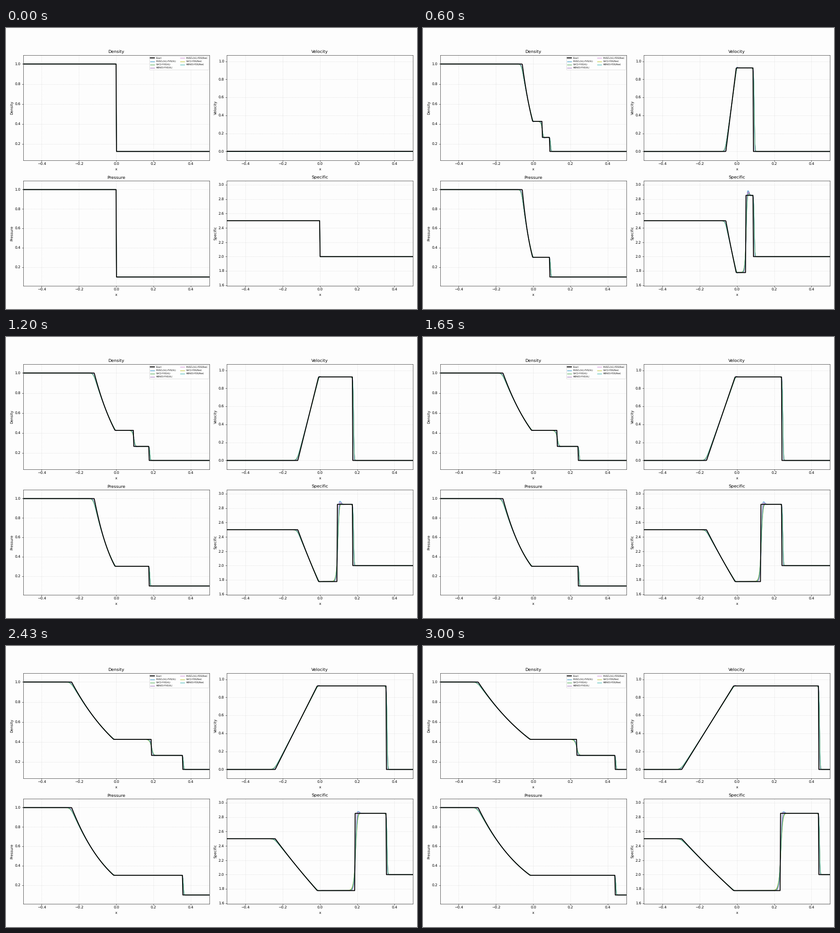
These frames come from a looping animation (903 px wide and 620 px high, 3030 ms). A matplotlib script:

```python
"""Sod shock tube: six finite-difference schemes against the exact solution."""
import numpy as np
import matplotlib.pyplot as plt
from matplotlib.animation import FuncAnimation

plt.rcParams["font.family"] = "DejaVu Sans"
plt.rcParams["text.hinting"] = "none"

G = 1.4
FRAMES, INTERVAL = 101, 30
T_FRAME, SUBSTEPS = 0.0025, 5
W, H, DPI = 903, 620, 56.4375

x = np.linspace(-0.5, 0.5, 400)
dx = x[1] - x[0]


# ---- gas dynamics ----
def primitive(q):
    rho = np.maximum(q[0], 1e-6)
    u = q[1] / rho
    p = np.maximum((G - 1) * (q[2] - 0.5 * rho * u * u), 1e-6)
    return rho, u, p


def flux(q, u, p):
    return np.array([q[1], q[1] * u + p, (q[2] + p) * u])


def van_leer_split(q, s):
    """Forward (s=1) or backward (s=-1) part of the flux."""
    rho, u, p = primitive(q)
    c = np.sqrt(G * p / rho)
    m = u / c
    mass = s * rho * c * (m + s) ** 2 / 4
    w = (G - 1) * u + 2 * s * c
    part = np.array([mass, mass * w / G, mass * w * w / (2 * (G * G - 1))])
    part = np.where(s * m >= 1, flux(q, u, p), part)
    return np.where(s * m <= -1, 0.0, part)


def roe_flux(ql, qr):
    rl, ul, pl = primitive(ql)
    rr, ur, pr = primitive(qr)
    a, b = np.sqrt(rl), np.sqrt(rr)
    hl, hr = (ql[2] + pl) / rl, (qr[2] + pr) / rr
    u = (a * ul + b * ur) / (a + b)
    h = (a * hl + b * hr) / (a + b)
    c2 = np.maximum((G - 1) * (h - 0.5 * u * u), 1e-6)
    c = np.sqrt(c2)
    dp, du = pr - pl, ur - ul
    k = a * b * c * du
    w1 = np.abs(u - c) * (dp - k) / (2 * c2)
    w2 = np.abs(u) * (rr - rl - dp / c2)
    w3 = np.abs(u + c) * (dp + k) / (2 * c2)
    diss = np.array([
        w1 + w2 + w3,
        w1 * (u - c) + w2 * u + w3 * (u + c),
        w1 * (h - u * c) + w2 * 0.5 * u * u + w3 * (h + u * c),
    ])
    return 0.5 * (flux(ql, ul, pl) + flux(qr, ur, pr) - diss)


# ---- reconstruction at the face between b and c, upwind side a ----
def muscl(a, b, c):
    dl, dr = b - a, c - b
    total = dl + dr
    return b + np.maximum(dl * dr, 0) / np.where(total == 0, 1, total)


def gvc2(a, b, c):
    dl, dr = b - a, c - b
    return b + 0.5 * np.where(np.abs(dl) < np.abs(dr), dl, dr)


def weno3(a, b, c):
    w0 = 1 / (1e-6 + (b - a) ** 2) ** 2
    w1 = 2 / (1e-6 + (c - b) ** 2) ** 2
    return (w0 * (1.5 * b - 0.5 * a) + w1 * 0.5 * (b + c)) / (w0 + w1)


def stencil(v):
    return v[:, :-3], v[:, 1:-2], v[:, 2:-1], v[:, 3:]


def fvs(q, rec):
    a, b, c, _ = stencil(van_leer_split(q, 1))
    _, e, f, g = stencil(van_leer_split(q, -1))
    return rec(a, b, c) + rec(g, f, e)


def fds(q, rec):
    a, b, c, d = stencil(q)
    return roe_flux(rec(a, b, c), rec(d, c, b))


def fields(rho, u, p):
    return rho, u, p, p / ((G - 1) * rho)


def solve(method, rec):
    """Initial state, then snapshots running one output step ahead."""
    left = x < 0
    q = np.array([np.where(left, 1, 0.125), 0 * x,
                  np.where(left, 1, 0.1) / (G - 1)])
    dt = T_FRAME / SUBSTEPS

    def euler(q):
        padded = np.concatenate([q[:, :1], q[:, :1], q, q[:, -1:], q[:, -1:]],
                                axis=1)
        f = method(padded, rec)
        return q - dt / dx * (f[:, 1:] - f[:, :-1])

    history = [fields(*primitive(q))]
    for i in range(1, FRAMES):
        for _ in range(SUBSTEPS * (2 if i == 1 else 1)):
            q1 = euler(q)
            q2 = 0.75 * q + 0.25 * euler(q1)
            q = q / 3 + 2 / 3 * euler(q2)
        history.append(fields(*primitive(q)))
    return history


def exact(t):
    ps, us = 0.30313018, 0.92745262
    cl = np.sqrt(G)
    rho_l = ps ** (1 / G)
    ratio, mu = ps / 0.1, (G - 1) / (G + 1)
    rho_r = 0.125 * (ratio + mu) / (1 + mu * ratio)
    shock = us * rho_r / (rho_r - 0.125)
    tail = us - np.sqrt(G * ps / rho_l)

    s = x / max(t, 1e-12)
    fan_u = 2 / (G + 1) * (cl + s)
    fan_c = np.clip(1 - (G - 1) / 2 * fan_u / cl, 0.1, 1)
    zones = [s < -cl, s < tail, s < us, s < shock]
    rho = np.select(zones, [1, fan_c ** (2 / (G - 1)), rho_l, rho_r], 0.125)
    u = np.select(zones, [0, fan_u, us, us], 0)
    p = np.select(zones, [1, fan_c ** (2 * G / (G - 1)), ps, ps], 0.1)
    return fields(rho, u, p)


SCHEMES = [
    ("MUSCL(VL)-FVS(VL)", fvs, muscl, "#1f88c4"),
    ("GVC2-FVS(VL)", fvs, gvc2, "#44a544"),
    ("WENO3-FVS(VL)", fvs, weno3, "#a06cbc"),
    ("MUSCL(VL)-FDS(Roe)", fds, muscl, "#d088d6"),
    ("GVC2-FDS(Roe)", fds, gvc2, "#bfc328"),
    ("WENO3-FDS(Roe)", fds, weno3, "#35b3b3"),
]
runs = [solve(method, rec) for _, method, rec, _ in SCHEMES]

# ---- figure ----
PANELS = [
    ("Density", 37.5, 60.2, (0.0375, 1.0875)),
    ("Velocity", 484.8, 60.2, (-0.097, 1.068)),
    ("Pressure", 37.5, 337.2, (0.01, 1.09)),
    ("Specific", 484.8, 337.2, (1.594, 3.056)),
]
AX_W, AX_H = 409.6, 231.5

fig = plt.figure(figsize=(16, 10.986), dpi=DPI, facecolor="#fdfdfd")
exact_lines, scheme_lines = [], []
for name, left, top, ylim in PANELS:
    ax = fig.add_axes([left / W, 1 - (top + AX_H) / H, AX_W / W, AX_H / H],
                      facecolor="#fdfdfd")
    ax.set(xlim=(-0.5, 0.5), ylim=ylim, title=name, xlabel="x", ylabel=name)
    ax.grid(True, linestyle="--", alpha=0.4)
    exact_lines += ax.plot([], [], color="black", lw=2.5, zorder=4,
                           label="Exact")
    scheme_lines.append([
        ax.plot([], [], color=color, lw=1.8, alpha=0.8, label=label)[0]
        for label, _, _, color in SCHEMES])
fig.axes[0].legend(loc="upper right", ncol=2, fontsize=5.8)


def update(i):
    truth = exact(i * T_FRAME)
    for k, line in enumerate(exact_lines):
        line.set_data(x, truth[k])
        for run, curve in zip(runs, scheme_lines[k]):
            curve.set_data(x, run[i][k])
    return exact_lines


anim = FuncAnimation(fig, update, frames=FRAMES, interval=INTERVAL,
                     repeat=True)
plt.show()
```
